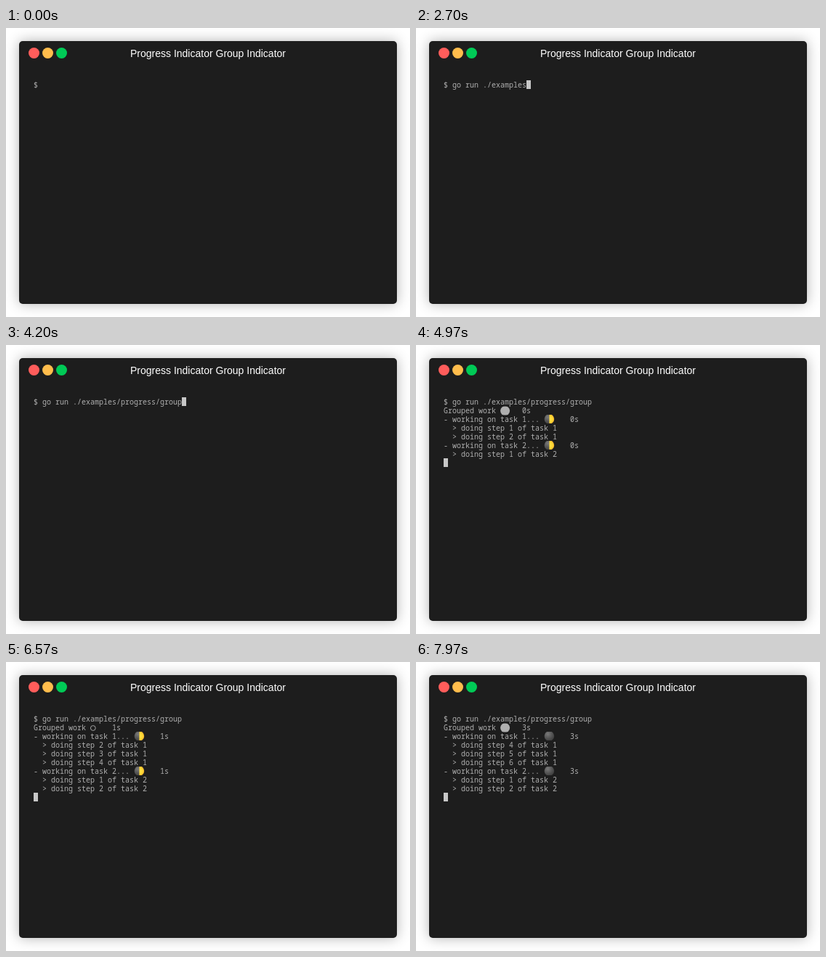
Animation, 556 px wide and 398 px high, one loop 8 s. Source, as an HTML page:

```html
<!DOCTYPE html>
<html lang="en">
<head>
<meta charset="utf-8">
<title>Progress Indicator Group Indicator</title>
<style>
  html, body { margin: 0; width: 100%; height: 100%; overflow: hidden; background: #fff; }
  #window {
    position: absolute; left: 18px; top: 18px; width: 520px; height: 362px;
    border-radius: 5px; background: #1d1d1d; box-shadow: 0 0 18px rgba(0, 0, 0, .3);
  }
  svg { position: absolute; left: 0; top: 0; display: block; }
  .title { font: 14px "Liberation Sans", Arial, sans-serif; fill: #fff; text-anchor: middle; }
  .row { font: 10px "Noto Sans Mono", "DejaVu Sans Mono", monospace; fill: #afafaf; white-space: pre; }
</style>
</head>
<body>
<div id="window"></div>
<svg width="556" height="398" viewBox="0 0 556 398">
  <defs>
    <radialGradient id="dark" cx=".35" cy=".3" r=".75">
      <stop offset="0" stop-color="#7a7a7a"/>
      <stop offset=".5" stop-color="#595959"/>
      <stop offset="1" stop-color="#3c3c3c"/>
    </radialGradient>
    <radialGradient id="lit" gradientUnits="userSpaceOnUse" cx="0" cy="0" r="7">
      <stop offset="0" stop-color="#ffe04a"/>
      <stop offset=".65" stop-color="#fdd835"/>
      <stop offset="1" stop-color="#f2ac28"/>
    </radialGradient>
    <clipPath id="cell"><rect x="-8" y="-6" width="16" height="12"/></clipPath>
  </defs>
  <circle cx="38.5" cy="34.5" r="7.5" fill="#ff5d5b"/>
  <circle cx="57.5" cy="34.5" r="7.5" fill="#ffbd4c"/>
  <circle cx="76.5" cy="34.5" r="7.5" fill="#00ca56"/>
  <text class="title" x="278" y="40">Progress Indicator Group Indicator</text>
  <g id="screen"></g>
</svg>
<script>
const LOOP = 8000, LEFT = 38, TOP = 72, COL = 6, ROW = 12;
const COMMAND = "go run ./examples/progress/group";
const ENTER = 4300, WORK = 4770;
const SKIPPED = [5, 8, 10, 15, 19, 28]; // ticks that hold the previous picture
const TASK1 = [0, 0, 13, 17, 22, 27];   // tick at which each step appears
const TASK2 = [0, 16];
const screen = document.getElementById("screen");

const rowText = (row, s) =>
  `<text class="row" x="${LEFT}" y="${TOP + row * ROW + 10}">${s.replace(/>/g, "&gt;")}</text>`;

const cursor = (row, col) =>
  `<rect x="${LEFT + col * COL}" y="${TOP + row * ROW}" width="${COL}" height="${ROW}" fill="#c7c7c7"/>`;

function moon(row, phase) {
  const r = 6.8, k = Math.cos(phase * Math.PI / 4);
  const lit = `M0 ${-r}A${r} ${r} 0 0 1 0 ${r}A${Math.abs(k) * r} ${r} 0 0 ${k > 0 ? 0 : 1} 0 ${-r}Z`;
  const flip = phase > 4 ? -1 : 1;
  const light = phase === 0 ? "" :
    `<path d="${lit}" fill="url(#lit)" transform="scale(${flip} 1)"/>`;
  return `<g transform="translate(183.4 ${TOP + row * ROW + 6})" clip-path="url(#cell)">
    <circle r="${r}" fill="url(#dark)"/>${light}</g>`;
}

function dot(filled) {
  return filled
    ? `<g transform="translate(122.6 90.6)" clip-path="url(#cell)"><circle r="6.5" fill="#afafaf"/></g>`
    : `<circle cx="119.8" cy="91" r="3.4" fill="none" stroke="#afafaf" stroke-width=".9"/>`;
}

function typed(t) {
  let n = Math.max(0, Math.floor((t - 1000) / 100));
  if (n < 25 && n % 6 === 1) n--;
  return COMMAND.slice(0, n);
}

function progress(t) {
  let tick = Math.floor((t - WORK) / 100);
  if (SKIPPED.includes(tick)) tick--;
  const time = Math.floor(tick / 10) + "s";
  let row = 1;
  let out = rowText(row++, " ".repeat(18).replace(/^ {12}/, "Grouped work") + time)
    + dot(Math.floor(tick / 5) % 2 === 0);
  [TASK1, TASK2].forEach((starts, i) => {
    const task = i + 1;
    out += rowText(row, `- working on task ${task}...`.padEnd(29) + time) + moon(row, tick % 8);
    row++;
    const done = starts.filter(s => s <= tick).length;
    for (let step = Math.max(1, done - 2); step <= done; step++)
      out += rowText(row++, `  > doing step ${step} of task ${task}`);
  });
  return out + cursor(row, 0);
}

let shown = "";
function draw(t) {
  const text = "$ " + typed(t);
  let out = rowText(0, text);
  if (t >= WORK) out += progress(t);
  else if (t >= ENTER) out += cursor(1, 0);
  else if (t >= 100) out += cursor(0, text.length);
  if (out !== shown) screen.innerHTML = shown = out;
}

function frame() {
  draw(performance.now() % LOOP);
  requestAnimationFrame(frame);
}
frame();
</script>
</body>
</html>
```
